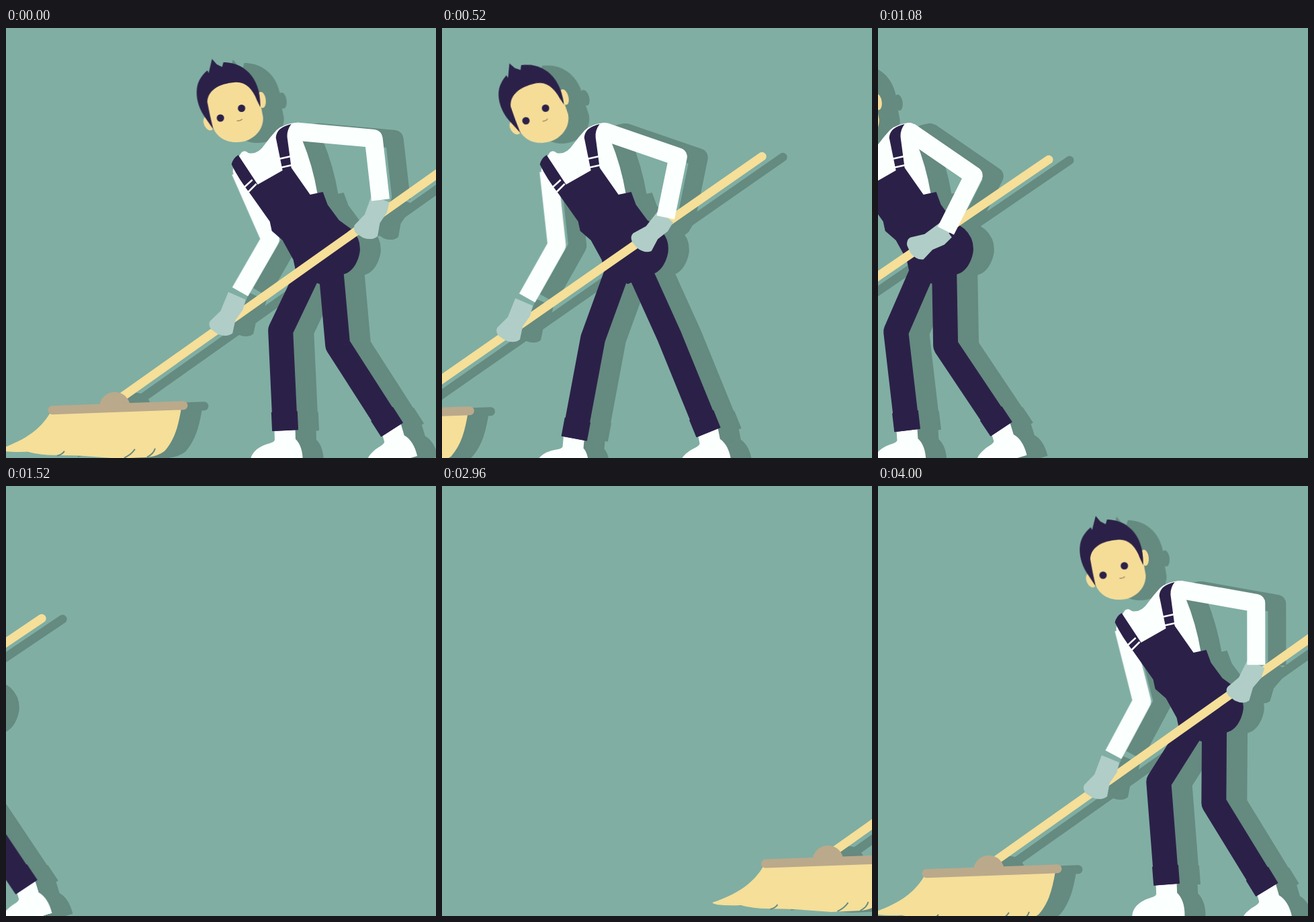
An HTML page for the animation above (4.04 s loop, 640 by 640 pixels).

```html
<!DOCTYPE html>
<html lang="en">
<head>
<meta charset="utf-8">
<title>Sweeper</title>
<style>
  html, body { margin: 0; width: 100%; height: 100%; overflow: hidden; background: #80aea3; }
  svg { display: block; width: 100%; height: 100%; }
  .navy { fill: #2b2148; }
  .white { fill: #fbfffe; }
  .skin { fill: #f5dd98; }
  .glove { fill: #b0cdc7; }
  .straw { fill: #f5df99; }
  .wood { fill: #bba98b; }
  .line { fill: none; }
  .sleeve { stroke: #fbfffe; stroke-width: 27; stroke-linejoin: round; }
  .leg { stroke: #2b2148; stroke-width: 37; stroke-linejoin: round; }
  .cuff { stroke: #2b2148; stroke-width: 39; }
</style>
</head>
<body>
<svg viewBox="0 0 640 640">
  <defs>
    <path id="glove" class="glove" d="M0 15L-3-13L12-17L31-15L50-21Q60-17 62-3L61 9Q58 17 51 17L30 11Z"/>
    <path id="shoe" class="white" d="M-16-4H15V13C22 20 26 32 25 48H-53C-54 38-47 28-36 23C-27 18-19 19-16 14Z"/>
    <filter id="shade" filterUnits="userSpaceOnUse" x="-1000" y="-100" width="3000" height="900" color-interpolation-filters="sRGB">
      <feFlood flood-color="#658a80"/>
      <feComposite in2="SourceAlpha" operator="in"/>
    </filter>
  </defs>
  <use href="#scene" transform="translate(31 1)" filter="url(#shade)"/>
  <g id="scene">
    <g id="body">
      <circle class="white" cx="350" cy="213" r="12"/>
      <path id="armL" class="line sleeve"/>
      <use id="shoeL" href="#shoe"/>
      <use id="shoeR" href="#shoe"/>
      <path id="legL" class="line leg"/>
      <path id="legR" class="line leg"/>
      <path id="cuffL" class="line cuff"/>
      <path id="cuffR" class="line cuff"/>
      <circle class="white" cx="432" cy="154" r="13"/>
      <path class="white" d="M338 205L351 185Q356 181 361 186Q375 189 385 174Q393 163 403 152Q414 142 434 141L441 166Q457 205 464 247L440 260L385 255L364 247Z"/>
      <path class="navy" d="M336 203Q338 194 346 189L375 233L412 212L402 163Q403 148 425 143Q418 152 419 163L425 208L453 248L472 244L479 263L496 286L514 299Q529 313 527 333C524 352 513 366 500 367L467 381L433 368L428 345L412 316L396 302L393 288L364 247Q346 224 336 203Z"/>
      <path class="line" stroke="#fbfffe" stroke-width="2.5" d="M355 237L367 226M361 244L373 232M406 195L424 191M408 208L426 204"/>
      <g id="head">
        <ellipse class="skin" cx="302" cy="142" rx="7" ry="11" transform="rotate(-25 302 142)"/>
        <ellipse class="skin" cx="381" cy="107" rx="6" ry="12" transform="rotate(-8 381 107)"/>
        <path class="skin" d="M298 108C299 84 320 72 346 74C364 76 374 94 379 112L383 133C384 154 365 170 345 170C326 171 313 160 309 149Z"/>
        <path class="navy" d="M309 151L298 135C283 115 281 92 288 78Q292 70 300 63L302 67L307 46L314 54L322 58L324 51C352 51 380 71 379 118L374 108C367 89 355 79 340 81C318 83 301 92 300 110Q304 132 309 151Z"/>
        <circle class="navy" cx="319.500" cy="134" r="5.500"/>
        <circle class="navy" cx="351" cy="119.500" r="5.500"/>
        <path class="line" stroke="#b08a66" stroke-width="1.600" d="M344 138Q349 139 352 135.500"/>
      </g>
    </g>
    <g id="broom">
      <path id="pole" class="line" stroke="#f5df99" stroke-width="13" stroke-linecap="round"/>
      <circle class="wood" cy="8" r="23"/>
      <path class="straw" d="M-95 14C-108 37-128 55-172 70Q-170 75-130 74Q-110 79-90 79L-50 80L5 84L50 82Q65 80 74 73C90 55 95 33 99 9Z"/>
      <path class="line" stroke="#658a80" stroke-width="2" d="M-75 73Q-78 78-86 80M30 70Q25 78 14 83M60 69Q58 77 48 82"/>
      <path class="line" stroke="#bba98b" stroke-width="13" stroke-linecap="round" d="M-93 12L102 5"/>
    </g>
    <use id="handL" href="#glove"/>
    <use id="handR" href="#glove"/>
    <path id="armR" class="line sleeve"/>
  </g>
</svg>
<script>
const LOOP = 4040, SWEEP = 560, DEG = 180 / Math.PI;
const $ = id => document.getElementById(id);

// time, body x, head (dx, dy, turn), left knee, left hem, right knee, right hem
const WALK = [
  [3640, 562, -1, -3, 1, 1, 461, 7, 611, 57, 471, 160, 575],
  [4000, 427, -1, -1, 1, -9, 440, 3, 593, 73, 472, 152, 601],
  [4040, 410, 0, 0, 0, -1, 450, 6, 599, 84, 472, 165, 598],
  [4560, 220, -5.5, 2, -8, 5, 462, -23, 611, 118, 457, 177, 602],
  [5120, 25, 4, 3, 0, 2, 452, 19, 599, 76, 473, 159, 597]
];
// phase, shift along the path, height
const STROKE = [
  [0, 0, 565], [40, 14, 557], [80, -9, 550],
  [200, -4, 557], [520, -33, 564], [SWEEP, 0, 565]
];

function sample(keys, t) {
  let i = 1;
  while (i < keys.length - 1 && t > keys[i][0]) i++;
  const a = keys[i - 1], b = keys[i];
  const k = Math.max(0, Math.min(1, (t - a[0]) / (b[0] - a[0])));
  return a.map((v, j) => v + (b[j] - v) * k);
}

const line = (...pts) => 'M' + pts.map(p => p[0].toFixed(2) + ' ' + p[1].toFixed(2)).join('L');
const polar = (p, len, ang) => [p[0] + len * Math.cos(ang), p[1] + len * Math.sin(ang)];
const angle = (a, b) => Math.atan2(b[1] - a[1], b[0] - a[0]);
const put = (id, p, turn = 0) =>
  $(id).setAttribute('transform', `translate(${p[0]} ${p[1]}) rotate(${turn})`);

function elbow(from, to, upper, lower) {
  const d = Math.hypot(to[0] - from[0], to[1] - from[1]);
  const c = (upper * upper + d * d - lower * lower) / (2 * upper * d);
  return polar(from, upper, angle(from, to) - Math.acos(Math.max(-1, Math.min(1, c))));
}

function leg(side, hip, knee, hem) {
  const a = angle(knee, hem);
  $('leg' + side).setAttribute('d', line(hip, knee, hem));
  $('cuff' + side).setAttribute('d', line(polar(hem, -28, a), hem));
  put('shoe' + side, hem, (a * DEG - 90) / 2);
}

function draw(now) {
  const clock = now % LOOP;
  const t = clock < 2180 ? clock + LOOP : clock;

  const [, bx, hx, hy, turn, ...legs] = sample(WALK, t);
  const x = bx - Math.min(0, t - 3640) * 0.372 - Math.max(0, t - 5120) * 0.348;
  put('body', [x - 410, 0]);
  $('head').setAttribute('transform', `translate(${hx} ${hy}) rotate(${turn} 335 126)`);
  const joint = i => [410 + legs[i], legs[i + 1]];
  leg('L', [452, 360], joint(0), joint(2));
  leg('R', [484, 360], joint(4), joint(6));

  const phase = ((t - 4000) % SWEEP + SWEEP) % SWEEP;
  const [, shift, y] = sample(STROKE, phase);
  const base = [165 - 0.4027 * (t - 4000) + shift, y];
  const tilt = -(35.3 - 0.0009 * Math.max(0, t - LOOP)) / DEG;
  put('broom', base);
  $('pole').setAttribute('d', line([0, 0], polar([0, 0], 654, tilt)));

  const gripL = polar(base, 211, tilt - 0.045);
  const shL = [x - 61, 213];
  const elL = elbow(shL, gripL, 111, 130);
  const fL = angle(elL, gripL);
  const local = p => [p[0] - x + 410, p[1]];
  $('armL').setAttribute('d', line(...[shL, elL, polar(elL, 90, fL)].map(local)));
  put('handL', polar(elL, 99, fL), fL * DEG);

  const gripR = polar(base, 468 - 0.031 * Math.abs(t - LOOP), tilt);
  const shR = [x + 22, 154];
  const elR = elbow(shR, gripR, 116, 122);
  const fR = angle(elR, gripR);
  const wrist = polar(elR, 92, fR - 0.14);
  $('armR').setAttribute('d', line(shR, elR, wrist));
  put('handR', wrist, fR * DEG + 26);
}

const start = performance.now();
function tick() {
  draw(performance.now() - start);
  requestAnimationFrame(tick);
}
draw(0);
requestAnimationFrame(tick);
</script>
</body>
</html>
```
